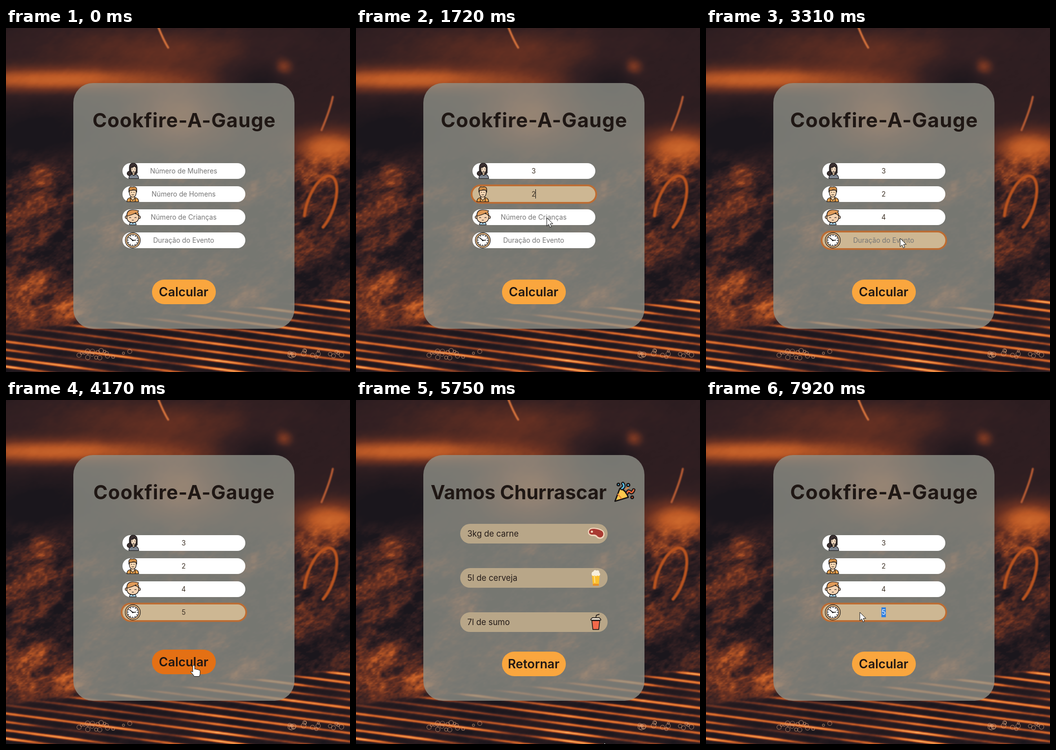
Animation, 700 px wide and 700 px high, one loop 7.99 s. Source, as an HTML page with a canvas:

```html
<!DOCTYPE html>
<html lang="pt">
<head>
<meta charset="utf-8">
<title>Cookfire-A-Gauge</title>
<style>
  html, body { margin: 0; width: 100%; height: 100%; overflow: hidden; background: #2c1e21; }
  canvas, svg { position: absolute; left: 0; top: 0; width: 700px; height: 700px; }
  text { font-family: Inter, "Open Sans", sans-serif; fill: #1f1714; }
  .title { font-weight: 700; }
  .field text { font-size: 13.8px; text-anchor: middle; }
  .item text { font-size: 16.8px; fill: #241b18; }
  .button text { font-size: 25.2px; font-weight: 600; text-anchor: middle; }
  .ink { stroke: #151212; stroke-width: 1.2; stroke-linejoin: round; stroke-linecap: round; }
  .line { fill: none; }
</style>
</head>
<body>
<canvas id="photo" width="700" height="700"></canvas>
<svg viewBox="0 0 700 700">
  <defs>
    <g id="woman" class="ink">
      <path d="M9 20V8q1-8 8-8t8 8v12q-3 4-8 4z" fill="#3b3031"/>
      <path d="M8 31.500q0-8 6-9l4 2 4-2q6 2 6 9z" fill="#7d8590"/>
      <path d="M15 18h5v5l-2 2-3-2z" fill="#edcba9"/>
      <path d="M12 9q6 0 7-4 1 3 4 4v5q-1 6-5.500 6T12 14z" fill="#f8dfc5"/>
      <circle cx="9" cy="21" r="4.500" fill="#3b3031"/>
      <path class="line" d="M14.500 12h1M19.500 12h1M16 16.500q1.500 1 3 0"/>
    </g>
    <g id="man" class="ink">
      <path d="M4 31.500q0-7 7-8.500h10q7 1.500 7 8.500z" fill="#e9a14c"/>
      <path d="M12 19h8v5l-4 5-4-5z" fill="#f6d5b0"/>
      <path d="M9 8h14v6q-1 8-7 8t-7-8z" fill="#f6d5b0"/>
      <path d="M8 12V5l3-4q4 1 8 0 5 1 5 5v6l-2-4-5-1-5 2-2-1z" fill="#cf8c45"/>
      <path class="line" d="M13 12.500h1M18 12.500h1M14 17.500h4M11 24v7M21 24v7"/>
    </g>
    <g id="child" class="ink">
      <path d="M9 31.500q1-6 7-6t7 6z" fill="#add9f3"/>
      <path d="M13 25l3 4 3-4z" fill="#f5cfaa"/>
      <circle cx="3.500" cy="16" r="3" fill="#f2c79f"/><circle cx="28.500" cy="16" r="3" fill="#f2c79f"/>
      <path d="M4 13q1-8 12-8t12 8q1 14-12 14T4 13z" fill="#f5d2b0"/>
      <path d="M4 14Q3 1 16 1q6 0 12 2l-2 3q3 3 2 7-4-4-7-4l2-2q-8 4-19 7z" fill="#df9a59"/>
      <path class="line" d="M9 17q1.500-1 3 0M20 17q1.500-1 3 0M14.500 22h3"/>
    </g>
    <g id="clock" class="ink">
      <circle cx="16" cy="16" r="15.300" fill="#f0c18b"/>
      <circle cx="16" cy="16" r="12" fill="#fff"/>
      <circle class="line" cx="16" cy="16" r="9.800" stroke-dasharray=".5 4.630" style="stroke-width:1.800"/>
      <path class="line" d="M10 11l6 5.500 6-1" style="stroke-width:1.600"/>
      <circle cx="16" cy="16" r="1"/>
    </g>
    <g id="popper" class="ink" style="stroke-width:2.600">
      <path d="M2 40L12 14q13 4 17 18z" fill="#ffc94d"/>
      <path class="line" d="M16 14q7-4 2-10M27 23q2-6 6-2t7-4" style="stroke-width:7"/>
      <path class="line" d="M16 14q7-4 2-10" style="stroke:#58bfe8;stroke-width:3"/>
      <path class="line" d="M27 23q2-6 6-2t7-4" style="stroke:#f06a3c;stroke-width:3"/>
      <circle cx="29" cy="7" r="3" fill="#58bfe8"/><circle cx="9" cy="6" r="2.500" fill="#58bfe8"/>
      <circle cx="37" cy="32" r="2.500" fill="#f06a3c"/>
      <path class="line" d="M24 15l5-3M8 26l7 8" style="stroke:#e8863a"/>
    </g>
    <g id="steak">
      <path d="M0 8Q1-1 13 0t18 6q5 6 1 13-5 6-13 2-4-5-10-4Q0 16 0 8z" fill="#f3d6bd"/>
      <path d="M2 8q1-7 11-6t16 5q4 5 1 10-4 5-10 1-4-5-10-4-8 0-8-6z" fill="#a93a32"/>
      <circle cx="8" cy="8" r="2.300" fill="#f3d6bd"/>
    </g>
    <g id="beer">
      <path d="M1 10h16l-2 23H3z" fill="#fbc02f"/>
      <path d="M3 29h12v4H3z" fill="#e8902a"/>
      <path d="M5 13h2l1 14H6z" fill="#ffe18a"/>
      <path d="M1 12Q-1 5 4 4q2-5 6-2 6-2 6 4 3 3 1 6-3 2-5 0-3 3-5 0-3 2-6 0z" fill="#f8efdc"/>
    </g>
    <g id="cup" class="ink" style="stroke-width:1.500">
      <path class="line" d="M11 9l1-6 6-2"/>
      <path d="M3 14h16l-2 18H5z" fill="#f3694a"/>
      <path d="M1 13v-2l3-3h14l3 3v2z" fill="#eee4d4"/>
    </g>
  </defs>

  <rect x="137" y="112" width="450" height="500" rx="40" fill="rgb(144,147,138)" fill-opacity=".78"/>

  <g id="form">
    <g id="formTitle"><text class="title" y="14" text-anchor="middle" font-size="40.800" letter-spacing="1">Cookfire-A-Gauge</text></g>
    <g id="fields"></g>
  </g>
  <g id="results">
    <g id="resultTitle">
      <text class="title" x="-208" y="14" font-size="39.300">Vamos Churrascar</text>
      <use href="#popper" x="165" y="-22"/>
    </g>
    <g id="items"></g>
  </g>
  <g id="button" class="button">
    <rect x="297" y="512" width="130" height="50" rx="25"/>
    <text id="label" x="361.500" y="545.500"></text>
  </g>
  <g id="cursor">
    <path id="arrow" d="M0 0v17l4-3.500 2.500 6 3-1.300L7 12.300h5.500z" fill="#fff" stroke="#111"/>
    <path id="hand" d="M-1 1q2-3 4 0v7q3-1.500 4 .500 3-1 4 1 3-.500 3 2v5q0 3-2 6H2q-2-4-7-9 0-3 4 0z" fill="#fff" stroke="#111" stroke-linejoin="round"/>
  </g>
</svg>

<script>
const $ = id => document.getElementById(id);
const clamp = x => Math.min(1, Math.max(0, x));
const ease = x => x * x * (3 - 2 * x);
const lerp = (a, b, k) => a + (b - a) * k;
const ramp = (t, from, length) => ease(clamp((t - from) / length));
const show = (el, on) => { el.style.display = on ? '' : 'none'; };

// ---- backdrop: a heat field with noise, coloured as embers ----
const hash = (x, y) => {
  let h = Math.imul(x, 374761393) + Math.imul(y, 668265263);
  h = Math.imul(h ^ (h >>> 13), 1274126177);
  return ((h ^ (h >>> 16)) >>> 0) / 4294967296;
};
function noise(x, y) {
  const ix = Math.floor(x), iy = Math.floor(y), u = ease(x - ix), v = ease(y - iy);
  return lerp(lerp(hash(ix, iy), hash(ix + 1, iy), u), lerp(hash(ix, iy + 1), hash(ix + 1, iy + 1), u), v);
}
function fractal(x, y) {
  let sum = 0;
  for (let size = 48, weight = .4; size >= 3; size /= 2, weight *= .75) {
    sum += weight * (noise(x / size / 1.5, (y + x * .3) / size) - .5);
  }
  return sum;
}

const EMBER = [[26, 22, 28], [52, 32, 34], [108, 50, 34], [186, 88, 38], [226, 122, 52], [250, 178, 104]];
function ember(heat) {
  const p = clamp(heat) * (EMBER.length - 1), i = Math.min(EMBER.length - 2, Math.floor(p));
  return EMBER[i].map((c, n) => lerp(c, EMBER[i + 1][n], p - i));
}

// centre, radii and strength of each warm or dark area
const GLOWS = [
  { x: 300, y: 45, rx: 200, ry: 45, heat: .2 },
  { x: 90, y: 105, rx: 230, ry: 25, heat: .5 },
  { x: 350, y: 180, rx: 100, ry: 70, heat: .4 },
  { x: 510, y: 110, rx: 55, ry: 35, heat: -.15 },
  { x: 565, y: 78, rx: 17, ry: 15, heat: .3 },
  { x: 60, y: 215, rx: 130, ry: 60, heat: -.18 },
  { x: 660, y: 245, rx: 80, ry: 38, heat: .55 },
  { x: 90, y: 295, rx: 60, ry: 25, heat: .2 },
  { x: 640, y: 420, rx: 55, ry: 90, heat: .26 },
  { x: 60, y: 565, rx: 150, ry: 40, heat: .4 },
  { x: 440, y: 550, rx: 160, ry: 25, heat: .25 },
];
const glow = (x, y) => GLOWS.reduce(
  (sum, g) => sum + g.heat * Math.exp(-(((x - g.x) / g.rx) ** 2) - ((y - g.y) / g.ry) ** 2), .15);

function grill(x, y) {
  const across = (y - x * .13) / 17, bar = Math.floor(across);
  const shine = Math.sin((across - bar) * Math.PI) ** 5;
  return .06 + shine * (.15 + .8 * noise(x / 110, bar * 3.7)) + .2 * fractal(x, y);
}

function paintPhoto() {
  const ctx = $('photo').getContext('2d');
  const image = ctx.createImageData(700, 700);
  for (let y = 0, at = 0; y < 700; y++) {
    for (let x = 0; x < 700; x++, at += 4) {
      const onGrill = ramp(y + x * .1, 612, 14);
      const rough = ramp(y, 235, 70);
      const meat = onGrill < 1 ? glow(x, y) + (rough * .85 + .08) * fractal(x, y) : 0;
      const heat = onGrill > 0 ? lerp(meat, grill(x, y), onGrill) : meat;
      image.data.set([...ember(heat), 255], at);
    }
  }
  ctx.putImageData(image, 0, 0);

  ctx.lineCap = 'round';
  const stroke = (color, width, draw) => {
    ctx.strokeStyle = color;
    ctx.lineWidth = width;
    ctx.beginPath();
    draw();
    ctx.stroke();
  };
  const arc = (x0, y0, cx, cy, x1, y1) => () => { ctx.moveTo(x0, y0); ctx.quadraticCurveTo(cx, cy, x1, y1); };
  ctx.filter = 'blur(1px)';
  stroke('#d8743d', 4, arc(309, -4, 320, 24, 330, 40));
  stroke('#b85c34', 4, arc(665, 140, 660, 165, 642, 208));
  stroke('#b9531f', 6, () => ctx.ellipse(640, 360, 27, 62, .35, 2.6, 7));
  ctx.filter = 'blur(.6px)';
  for (let i = 0; i < 36; i++) {
    const x = (i % 2 ? 145 : 575) + hash(i, 1) * 110, y = 655 + hash(i, 2) * 16;
    stroke('rgba(225,165,125,.6)', 1.2, () => ctx.arc(x, y, 2 + 3 * hash(i, 3), 0, 7));
  }
}

// ---- interface ----
const RESULT_AT = 4430, RETURN_AT = 6750, SELECT_AT = 7680, LOOP = 7990;
const FIELDS = [
  { icon: 'woman', hint: 'Número de Mulheres', value: '3', focus: 780, type: 1010 },
  { icon: 'man', hint: 'Número de Homens', value: '2', focus: 1320, type: 1540 },
  { icon: 'child', hint: 'Número de Crianças', value: '4', focus: 1830, type: 2080 },
  { icon: 'clock', hint: 'Duração do Evento', value: '5', focus: 2750, type: 3560 },
];
FIELDS.forEach((f, i) => { f.blur = FIELDS[i + 1]?.focus ?? RESULT_AT; });

$('fields').innerHTML = FIELDS.map((f, i) => `
  <g class="field" transform="translate(237 ${275 + i * 47})">
    <rect width="250" height="32" rx="16" fill="#fff"/>
    <rect class="ring" x="-1.800" y="-1.800" width="253.600" height="35.600" rx="17.800" fill="#cdb793" stroke="#bd6c32" stroke-width="3.600"/>
    <use href="#${f.icon}" x="5"/>
    <rect class="mark" x="120" y="6" width="9" height="20" fill="#2f7fe0"/>
    <text x="124.500" y="20.500"></text>
    <rect class="caret" y="6" width="1" height="19" fill="#111"/>
  </g>`).join('');
const rows = [...document.querySelectorAll('.field')].map(el => ({
  ring: el.querySelector('.ring'), mark: el.querySelector('.mark'),
  text: el.querySelector('text'), caret: el.querySelector('.caret'),
}));

$('items').innerHTML = [
  { text: '3kg de carne', icon: 'steak', x: 260, y: 8 },
  { text: '5l de cerveja', icon: 'beer', x: 267, y: 3 },
  { text: '7l de sumo', icon: 'cup', x: 265, y: 3 },
].map((item, i) => `
  <g class="item" transform="translate(212 ${252 + i * 90})">
    <rect width="300" height="40" rx="20" fill="#b8a688"/>
    <text x="14.500" y="25.500">${item.text}</text>
    <use class="pic" href="#${item.icon}" x="${item.x}" y="${item.y}"/>
  </g>`).join('');
const pics = document.querySelectorAll('.pic');

// time, x, y of the pointer's turning points
const STOPS = [
  [70, 400, 590], [750, 372, 290], [1190, 377, 340], [1680, 388, 385], [2240, 399, 456],
  [2720, 395, 428], [3600, 395, 428], [3950, 381, 540], [4890, 381, 540], [5300, 505, 697],
  [6080, 505, 697], [6700, 370, 540], [6940, 99, 652], [7650, 372, 432], [7900, 313, 432],
];
function cursorAt(t) {
  const next = STOPS.findIndex(stop => stop[0] > t);
  const [t1, x1, y1] = STOPS.at(next);
  const [t0, x0, y0] = STOPS[next - 1] ?? STOPS.at(next);
  const k = ramp(t, t0, t1 - t0 || 1);
  return [lerp(x0, x1, k), lerp(y0, y1, k)];
}

function setText(el, text) {
  if (el.textContent !== text) el.textContent = text;
}

function drawField(row, f, t, selectAt) {
  const level = ramp(t, f.focus, 180) - ramp(t, f.blur, 180) + ramp(t, selectAt, 180);
  const filled = t >= f.type, selected = t >= selectAt + 130;
  const active = t >= f.focus && t < f.blur;
  setText(row.text, filled ? f.value : f.hint);
  row.text.style.fill = selected ? '#fff' : filled ? '#3c3024' : '#757575';
  row.ring.style.opacity = level;
  row.caret.setAttribute('x', filled ? 128 : 124.5);
  show(row.mark, selected);
  show(row.caret, active && (t - (filled ? f.type : f.focus)) % 1000 < 500);
}

function render(t) {
  const onResults = t >= RESULT_AT && t < RETURN_AT;
  show($('form'), !onResults);
  show($('results'), onResults);

  const low = t < RESULT_AT ? 430 : 6800;
  const pulse = (1 - Math.cos((t - low) * Math.PI / 1000)) / 2;
  $('formTitle').setAttribute('transform', `translate(362.500 188) scale(${lerp(.958, 1, pulse)})`);
  rows.forEach((row, i) => drawField(row, FIELDS[i], t, i === 3 ? SELECT_AT : Infinity));

  const grow = clamp((t - RESULT_AT) / 1000);
  $('resultTitle').setAttribute('transform', `translate(360 188) scale(${grow})`);
  $('resultTitle').style.opacity = clamp(grow * 1.4);
  pics.forEach(pic => { pic.style.opacity = ramp(t, 5050, 400); });

  const hover = ramp(t, 3850, 200) - ramp(t, 4960, 200) + ramp(t, 6500, 200) - ramp(t, 6770, 200);
  const color = [250, 166, 62].map((c, i) => lerp(c, [228, 112, 20][i], hover));
  $('button').setAttribute('transform', `translate(0 ${-4 * hover})`);
  $('button').firstElementChild.style.fill = `rgb(${color})`;
  setText($('label'), onResults ? 'Retornar' : 'Calcular');

  const [x, y] = cursorAt(t);
  const pointing = x > 297 && x < 427 && y > 510 && y < 562;
  $('cursor').setAttribute('transform', `translate(${x} ${y})`);
  show($('cursor'), t >= 70);
  show($('arrow'), !pointing);
  show($('hand'), pointing);
}

paintPhoto();
const start = performance.now();
function tick() {
  render((performance.now() - start) % LOOP);
  requestAnimationFrame(tick);
}
tick();
</script>
</body>
</html>
```
